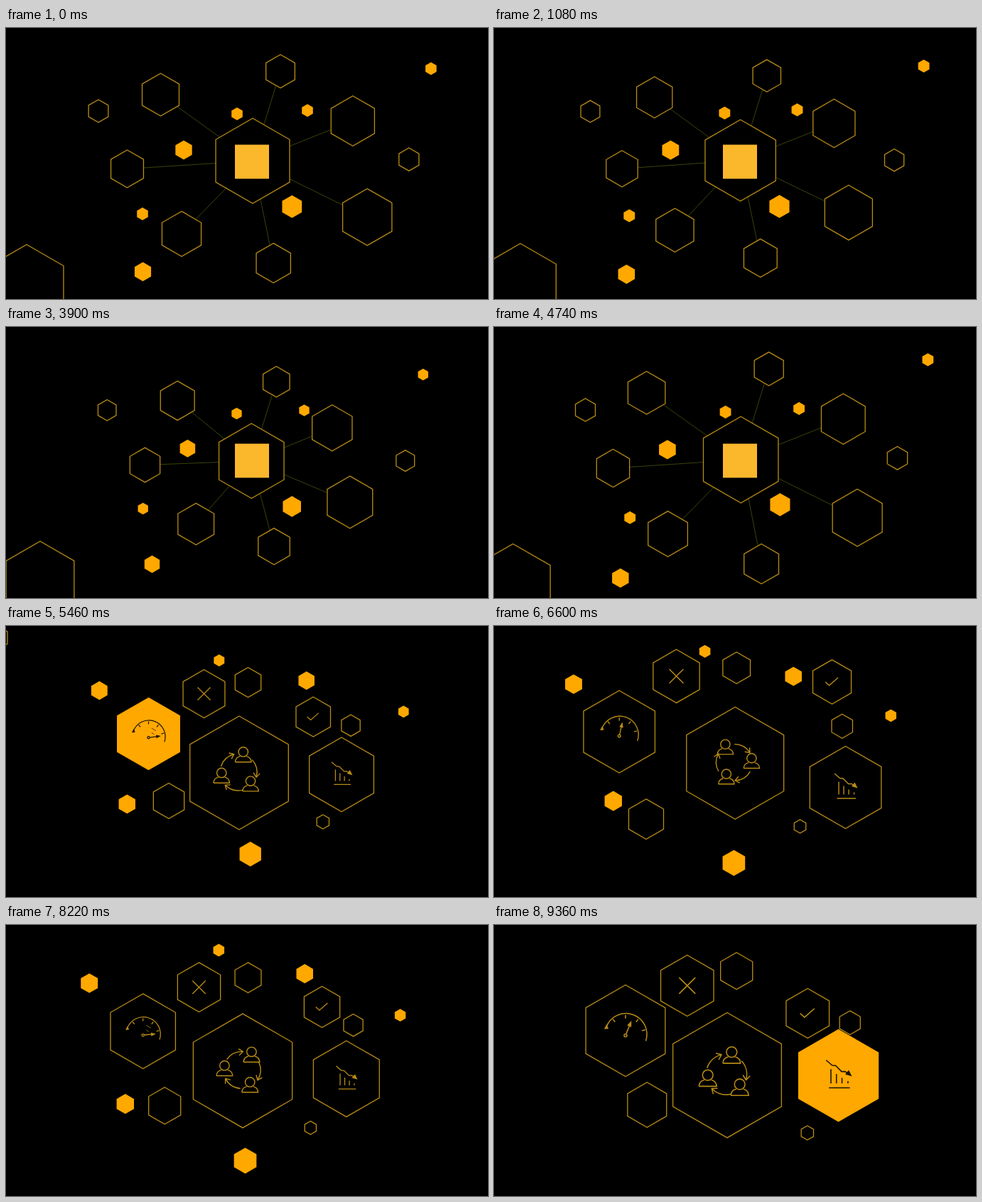
Recreate the animation shown at these times as an HTML page. Size 678 px wide and 382 px high, loop 9420 ms.

```html
<!DOCTYPE html>
<html lang="en">
<head>
<meta charset="utf-8">
<title>Hexagon network</title>
<style>
html, body { margin: 0; width: 100%; height: 100%; overflow: hidden; background: #000; }
svg { display: block; width: 100%; height: 100%; }
</style>
</head>
<body>
<svg id="stage" viewBox="0 0 678 382"></svg>
<script>
const LOOP = 9420, STEP = 60;
const GOLD = '#b98c16', ORANGE = '#ffa800', LINK = '#38440a';
const MORPH = 4860, SCENE2 = [5460, 6600, 8220, 9360];

const stage = document.getElementById('stage');
const el = (tag, attrs, parent = stage) => {
  const node = document.createElementNS('http://www.w3.org/2000/svg', tag);
  parent.appendChild(node);
  return set(node, attrs);
};
function set(node, attrs) {
  for (const k in attrs) node.setAttribute(k, attrs[k]);
  return node;
}

const clamp = v => Math.max(0, Math.min(1, v));
const smooth = v => { v = clamp(v); return v * v * (3 - 2 * v); };
const mix = (a, b, p) => a + (b - a) * p;

// Eased interpolation between [time, value] keys
function keyed(keys, t) {
  let i = 0;
  while (i < keys.length - 2 && t > keys[i + 1][0]) i++;
  const [t0, a] = keys[i], [t1, b] = keys[i + 1];
  return mix(a, b, smooth((t - t0) / (t1 - t0)));
}

// Cubic Hermite curve through the scene 2 key times
function curve(vals, t) {
  const T = SCENE2, n = T.length - 1;
  t = Math.max(T[0], Math.min(T[n], t));
  let i = 0;
  while (i < n - 1 && t > T[i + 1]) i++;
  const slope = j => {
    if (j === 0 || j === n) return 0;
    return (vals[j + 1] - vals[j - 1]) / (T[j + 1] - T[j - 1]);
  };
  const d = T[i + 1] - T[i], p = (t - T[i]) / d, q = 1 - p;
  return vals[i] * q * q * (1 + 2 * p) + vals[i + 1] * p * p * (3 - 2 * p)
    + slope(i) * d * p * q * q - slope(i + 1) * d * p * p * q;
}

// near: wide, tight and drifted positions; late: positions in scene 2
const hexes = [];
function hex(r, near, late, radii, opts = {}) {
  const h = { r, near, radii, ...opts };
  h.lx = late.filter((v, i) => i % 2 === 0);
  h.ly = late.filter((v, i) => i % 2 === 1);
  hexes.push(h);
  return h;
}
const dot = (r, near, late, size) =>
  hex(r, near, [...late, ...late.slice(-2)], [size, size * 1.045, size * 1.045, 0], { solid: true });

dot(9, [325, 121, 327, 124.5, 324.5, 122], [299.8, 48.5, 296.6, 35.8, 299.3, 35.5], 8.6);
dot(9, [424, 116.3, 416, 119.3, 419.5, 117.5], [422.7, 77, 421.2, 71, 420.2, 68.7], 13);
dot(9, [597.8, 57.2, 576.2, 68.8, 586.7, 67], [559.2, 120.7, 558.2, 126.3, 554.5, 127.2], 8.5);
dot(13.5, [250, 172, 255.2, 171.5, 255.4, 171.2], [131.3, 91, 112, 82, 117.2, 82], 13.2);
dot(16, [402.3, 251.8, 405, 252.5, 402.2, 253], [343.7, 321.5, 337.4, 334, 336.5, 332.2], 17.5);
dot(9, [192, 262, 197.5, 253.8, 192.7, 256], [170.3, 251, 167.8, 246.7, 167.8, 252.2], 13.5);
dot(13.4, [192.5, 343.5, 212.2, 332.2, 205.5, 334.3], [180, 330, 180, 330, 180, 330], 0);

const cross = hex(30, [217.5, 94, 244, 106, 241.2, 103.8],
  [278.5, 95.5, 256.5, 70.7, 271.5, 87.7, 271.8, 85.5], [34, 37.7, 34.8, 43], { linked: true });
hex(23.5, [386, 61, 378.8, 81.5, 380.3, 77.2],
  [340.5, 79.5, 341.2, 59, 340.5, 74.2, 341.2, 64.8], [21, 22.3, 21.3, 26], { linked: true });
const check = hex(35.3, [487.8, 131, 457.2, 142, 458.8, 142.3],
  [432.2, 128, 475.5, 78.8, 444.5, 115.5, 441.2, 124.5], [28, 31.2, 29, 35], { linked: true });
const gauge = hex(26.5, [170.5, 198.5, 201.2, 198, 195.5, 194.5],
  [200.5, 152, 176.2, 149, 192.7, 149.7, 185, 149], [50.6, 58, 52.8, 64.5], { linked: true });
hex(31.8, [247, 290.2, 271, 273.3, 267.2, 277.7],
  [229, 246.5, 214, 272.2, 223.2, 254.8, 215.3, 253.5], [25, 28.3, 26, 31.7], { linked: true });
hex(27.9, [376.2, 331.3, 371.7, 308.8, 377, 309.3],
  [445.8, 276, 430.5, 282.5, 428.3, 285.8, 440.8, 293], [10, 9.5, 9.4, 10], { linked: true });
const chart = hex(40, [508.2, 266.5, 478, 246.2, 483.8, 247],
  [472, 209.4, 494.5, 227.5, 478.8, 216.8, 484.5, 212.2], [52.4, 58, 53.6, 64.6], { linked: true });
hex(16, [130, 117, 147.7, 118.8, 142.2, 117.3],
  [-12.7, 16.5, -60, -20, -60, -20, -60, -20], [17, 17, 17, 17]);
hex(16.2, [566.8, 185.2, 554.7, 188.5, 561.7, 188.5],
  [485, 140.2, 489.7, 141.2, 488.5, 141.2, 500.7, 137.7], [15.2, 17, 15.7, 16.8]);
hex(60, [29, 365.3, 55, 354, 48, 357.3],
  [-80, 420, -80, 420, -80, 420, -80, 420], [60, 60, 60, 60]);
const hub = hex(60, [347, 187.3, 345.8, 185.2, 345.3, 188.8],
  [328, 207, 339.2, 193.2, 333, 205.5, 328, 211.7], [80, 79, 80.4, 88.2], { shrink: [.858, .88] });

const BREATH = [[0, 1], [990, .7], [2280, 0], [2900, .7], [3900, 0], [4830, 1.15]];

function early(h, t) {
  const n = h.near, [k1, k2] = h.shrink || [.895, .921];
  const drift = smooth((t - 2280) / 1620);
  let u = keyed(BREATH, t);
  if (h.solid) u *= 1 + .9 * smooth(t / 900);
  return {
    x: mix(mix(n[2], n[4], drift), n[0], u),
    y: mix(mix(n[3], n[5], drift), n[1], u),
    r: h.r * mix(mix(k1, k2, drift), 1, Math.min(u, 1.15))
  };
}
const later = (h, t) => ({ x: curve(h.lx, t), y: curve(h.ly, t), r: Math.max(0, curve(h.radii, t)) });

function pose(h, t) {
  if (t <= MORPH) return early(h, t);
  const b = later(h, t);
  if (t >= SCENE2[0]) return b;
  const a = early(h, MORPH), p = smooth((t - MORPH) / (SCENE2[0] - MORPH));
  return { x: mix(a.x, b.x, p), y: mix(a.y, b.y, p), r: mix(a.r, b.r, p) };
}

function outline({ x, y, r }) {
  const w = r * Math.sqrt(3) / 2, f = v => v.toFixed(2);
  return [[0, -r], [w, -r / 2], [w, r / 2], [0, r], [-w, r / 2], [-w, -r / 2]]
    .map(([a, b]) => f(x + a) + ',' + f(y + b)).join(' ');
}

// Build the drawing
const links = el('g', { stroke: LINK, 'stroke-width': 1 });
for (const h of hexes) {
  if (h.linked) h.link = el('line', {}, links);
}
for (const h of hexes) {
  h.node = el('polygon', h.solid ? { fill: ORANGE } : { fill: '#000', stroke: GOLD, 'stroke-width': 1.3 });
}
const badge = el('rect', { x: 322, y: 164.5, width: 48, height: 48, fill: '#fbb82c' });

const icon = (h, base) => {
  h.base = base;
  return h.icon = el('g', { fill: 'none', stroke: GOLD, 'stroke-width': 1.4 });
};
const path = (d, parent, attrs) => el('path', { d, ...attrs }, parent);

path('M-10-10L10 10M10-10L-10 10', icon(cross, 37.7));
path('M-9.5 0L-4 5L8.5-6', icon(check, 31.2));

const chartIcon = icon(chart, 58);
path('M-15.5-19.5L-8-13L-3.5-12.5L4-5L8.5-5L15-.5', chartIcon);
path('M17 1L8.5-1.5L13-7Z', chartIcon, { fill: 'currentColor', stroke: 'none' });
path('M-9.5-8V10M-2.5-2V10M4.5 3V10M12 7V10M-12 15.5H14.5', chartIcon);

const dial = el('g', { transform: 'translate(0 6)' }, icon(gauge, 58));
path('M-24.5-10A26.4 26.4 0 0 1 25.6 7', dial);
path('M-27-8L-24-14L-21.5-8.5Z', dial, { fill: 'currentColor', stroke: 'none' });
for (const a of [-38, 0, 38, 74]) path('M0-26V-21.5', dial, { transform: `rotate(${a})` });
const glints = path('M5-15L12-11M5-8L9-5', dial, { 'stroke-width': 1 });
const needle = el('g', {}, dial);
path('M0-2V-15', needle);
path('M0-20L-2.8-12.5H2.8Z', needle, { fill: 'currentColor', stroke: 'none' });
el('circle', { r: 1.8 }, dial);

const team = el('g', { transform: 'translate(-1 -1)' }, icon(hub, 80));
const arrows = el('g', {}, team);
const people = [0, 120, 240].map(a => {
  path('M13.8-22A26 26 0 0 1 26 0M20.5-5L26 0L29.5-6.5', arrows, { transform: `rotate(${a})` });
  const g = el('g', {}, team);
  el('circle', { cy: -5, r: 6.7 }, g);
  path('M-11.3 9.3C-11 4-8 2-4.5 1.2M4.5 1.2C8 2 11 4 11.3 9.3H-11.3', g);
  return { g, a };
});

function draw(t) {
  for (const h of hexes) {
    h.p = pose(h, t);
    set(h.node, { points: outline(h.p) });
  }
  for (const h of hexes) {
    if (h.link) set(h.link, { x1: hub.p.x, y1: hub.p.y, x2: h.p.x, y2: h.p.y });
  }
  const gone = 1 - smooth((t - MORPH) / 240);
  set(links, { opacity: gone });
  set(badge, { opacity: gone });

  const shown = smooth((t - 5100) / 300);
  for (const h of [cross, check, chart, gauge, hub]) {
    const lit = h === gauge ? t >= 5340 && t < 5940 : h === chart && t >= 8940;
    const ink = lit ? '#1c1400' : GOLD;
    set(h.node, { fill: lit ? ORANGE : '#000', stroke: lit ? ORANGE : GOLD });
    set(h.icon, {
      transform: `translate(${h.p.x} ${h.p.y}) scale(${h.p.r / h.base})`,
      opacity: shown, stroke: ink, color: ink
    });
  }

  const tilt = curve([83, 13, 85, 22], t);
  set(needle, { transform: `rotate(${tilt})` });
  set(glints, { opacity: tilt > 65 ? .8 : 0 });

  const turn = curve([16, 88, 153, 256], t);
  set(arrows, { transform: `rotate(${turn})` });
  for (const { g, a } of people) {
    const w = (turn + a) * Math.PI / 180;
    set(g, { transform: `translate(${24.5 * Math.sin(w)} ${-24.5 * Math.cos(w)})` });
  }
}

const start = performance.now();
function tick() {
  const t = (performance.now() - start) % LOOP;
  draw(Math.floor(t / STEP) * STEP);
  requestAnimationFrame(tick);
}
tick();
</script>
</body>
</html>
```
